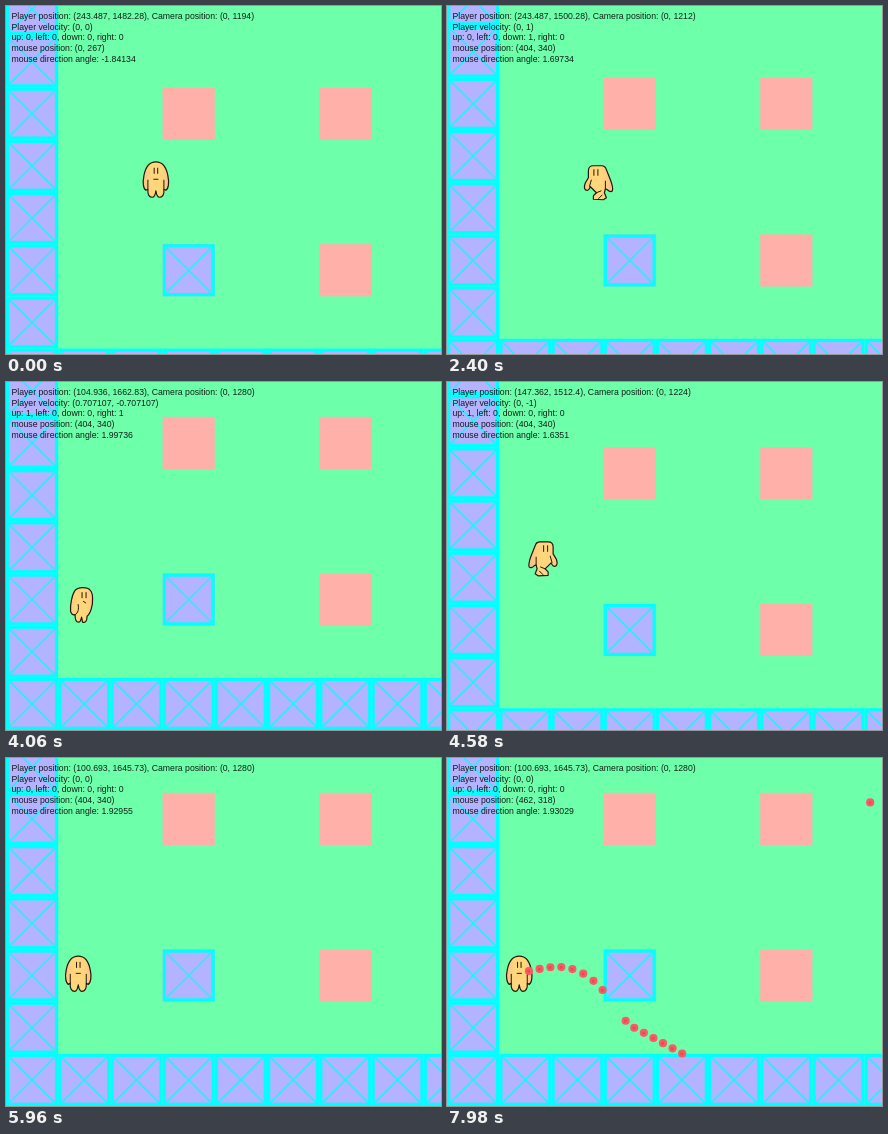
Write an HTML page with a canvas that moves like this. It is 435 by 348 pixels and loops after 8000 ms.

```html
<!DOCTYPE html>
<html lang="en">
<head>
<meta charset="utf-8">
<title>Top-down shooter</title>
<style>
  html, body { margin: 0; width: 100%; height: 100%; overflow: hidden; background: #6effaa; }
  canvas { display: block; width: 435px; height: 348px; }
</style>
</head>
<body>
<canvas id="stage" width="435" height="348"></canvas>
<script>
const ctx = document.getElementById('stage').getContext('2d');
const SCALE = 435 / 800;   // the game world is 800 x 640 units per screen
const LOOP = 8000, TICK = 20;
const TILE = 96, FLOOR = 1824, BLOCK = { x: 288, y: 1632 };
const START = { x: 243.487, y: 1482.279 };
const WALK_START = 2342, WALK_TICK = 18.7, WALK_SPEED = 6;
const SHOT_START = 6100, SHOT_SPEED = 20;

// keys held down, each for a number of steps
const ROUTE = 'D17 DL28 D5 R12 U11 L16 -1 UR11 U25 UL11 D37'.split(' ').map(run => {
  const [, keys, count] = run.match(/(\D+)(\d+)/);
  const held = key => +keys.includes(key);
  return { dx: held('R') - held('L'), dy: held('D') - held('U'), count: +count };
});

// turning points of the aim: time, degrees below the horizontal
const AIM = [
  [6100, -21], [6260, -22.2], [6700, 22.3], [6740, 22.3], [6800, -3.262],
  [6880, -36.5], [7260, -36.5], [7620, 28.3], [7760, 28.3], [7960, -11], [7980, -20.6]
];

const POSES = {
  idle: {
    body: 'M17.5-.8C25-.8 28 5 29.5 13C31 20 30 26 27.5 27.5L25.5 26.5C26 32 24 34.5 21 34.5C18.5 34.5 18 31 17.5 28C17 31 16.5 34.5 14 34.5C11 34.5 9 32 9.5 26.5L7.5 27.5C5 26 4 20 5.5 13C7 5 10-.8 17.5-.8Z',
    lines: 'M9.5 17V26.5M25.5 17V26.5M15 16.5H20',
    eyes: 'M15.8 5V11M19.3 5V11'
  },
  walk: {
    body: 'M9 8Q9 3 14 3H22Q26 3 27 7L31 17Q34 25 33 28Q31 30 28 27L26 26 25 30 27 35 24 37 14 36.5 14 33 17 30 11 24Q9 29 6 27Q4 25 6 20L9 15Z',
    lines: 'M26 18V26M12 17L10 24M17 30L22 28M19 36L23 32',
    eyes: 'M14.5 6.5V13M18.5 6.5V13'
  },
  side: {
    body: 'M8 4C10 1 20 0 23.5 5C26 9 28 18 27.5 25C27 28 25 29 23 28.5C23 32 22.5 36 19.5 36C17.5 36 17 33 16.5 31L15.5 36C12 37 11 34 11 30C8 28 5 20 5.5 12C5.5 8 6 6 8 4Z',
    lines: 'M20 18C19 23 20 27 23 28.5M12 17L15 15',
    eyes: 'M12 6V12M16 6V12'
  }
};
for (const pose of Object.values(POSES))
  for (const part in pose) pose[part] = new Path2D(pose[part]);

const clamp = u => Math.min(1, Math.max(0, u));
const lerp = (a, b, u) => a + (b - a) * u;
const smooth = u => u * u * (3 - 2 * u);
const easeOut = u => 1 - (1 - u) ** 3;
const sixDigits = v => String(Number(v.toPrecision(6)));

function playerAt(t) {
  let left = Math.max(0, Math.floor((t - WALK_START) / WALK_TICK));
  let { x, y } = START;
  for (const { dx, dy, count } of ROUTE) {
    if (!left) break;
    const steps = Math.min(left, count);
    const norm = Math.hypot(dx, dy) || 1;
    x += steps * WALK_SPEED * dx / norm;
    y += steps * WALK_SPEED * dy / norm;
    left -= steps;
    if (!left) return { x, y, dx, dy };
  }
  return { x, y, dx: 0, dy: 0 };
}

// Upward sweeps of the angle start fast, downward ones start gently.
function aimAt(t) {
  let i = 0;
  while (i < AIM.length - 2 && AIM[i + 1][0] <= t) i++;
  const [t0, a] = AIM[i], [t1, b] = AIM[i + 1];
  const ease = b > a ? easeOut : smooth;
  return lerp(a, b, ease(clamp((t - t0) / (t1 - t0)))) * Math.PI / 180;
}

function mouseAt(t, player, cam) {
  if (t < SHOT_START) {
    const u = smooth(clamp((t - TICK) / 1640));
    return { x: Math.round(lerp(0, 404, u)), y: Math.round(lerp(267, 340, u)) };
  }
  const angle = aimAt(t);
  const reach = t < 6800 ? lerp(255.6, 381.93, (t - SHOT_START) / 700)
                         : lerp(381.93, 317.6, (t - 6800) / 1180);
  return {
    x: Math.round(player.x + 64 + reach * Math.cos(angle)),
    y: Math.round(player.y - cam + 64 + reach * Math.sin(angle))
  };
}

function drawWall(x, y) {
  ctx.fillStyle = '#00ffff';
  ctx.fillRect(x, y, TILE, TILE);
  ctx.fillStyle = '#b3b3ff';
  ctx.fillRect(x + 6, y + 6, TILE - 12, TILE - 12);
  ctx.strokeStyle = '#00ffff';
  ctx.lineWidth = 2.3;
  ctx.beginPath();
  ctx.moveTo(x + 6, y + 6);
  ctx.lineTo(x + 90, y + 90);
  ctx.moveTo(x + 90, y + 6);
  ctx.lineTo(x + 6, y + 90);
  ctx.stroke();
}

function drawWorld() {
  ctx.fillStyle = '#ffb0a8';
  for (let row = 11; row <= 17; row += 3)
    for (let col = 3; col <= 6; col += 3)
      ctx.fillRect(col * TILE, row * TILE, TILE, TILE);
  for (let row = 11; row < 19; row++) drawWall(0, row * TILE);
  for (let col = 1; col < 9; col++) drawWall(col * TILE, FLOOR);
  drawWall(0, FLOOR);
  drawWall(BLOCK.x, BLOCK.y);
}

function drawPlayer({ x, y, dx, dy }, t) {
  const odd = Math.floor(t / 160) % 2 === 1;
  const name = dx ? 'side' : dy ? 'walk' : 'idle';
  const pose = POSES[name];
  const mirrored = name === 'side' ? dx > 0 : name === 'walk' && !odd;
  ctx.save();
  ctx.translate(x, y);
  ctx.scale(1 / SCALE, 1 / SCALE);
  if (name === 'side' && odd) ctx.translate(0, -4);
  if (mirrored) {
    ctx.translate(35, 0);
    ctx.scale(-1, 1);
  }
  const tone = ctx.createLinearGradient(4, 0, 31, 0);
  tone.addColorStop(0, '#ffbf8c');
  tone.addColorStop(0.3, '#ffd67c');
  tone.addColorStop(0.7, '#ffd67c');
  tone.addColorStop(1, '#ffbf8c');
  ctx.fillStyle = tone;
  ctx.fill(pose.body);
  ctx.strokeStyle = '#201808';
  ctx.lineJoin = 'round';
  ctx.lineWidth = 1.2;
  ctx.stroke(pose.body);
  ctx.lineWidth = 1;
  ctx.stroke(pose.lines);
  ctx.stroke(pose.eyes);
  ctx.restore();
}

const blocked = (x, y) => y > FLOOR ||
  (x > BLOCK.x && x < BLOCK.x + TILE && y > BLOCK.y - 10 && y < BLOCK.y + TILE + 10);

function drawShots({ x, y }, t) {
  for (let fired = SHOT_START; fired <= t; fired += TICK) {
    const angle = aimAt(fired), steps = (t - fired) / TICK;
    let sx = x + 50, sy = y + 26, alive = true;
    for (let i = 0; i < steps && alive; i++) {
      sx += SHOT_SPEED * Math.cos(angle);
      sy += SHOT_SPEED * Math.sin(angle);
      alive = !blocked(sx, sy);
    }
    if (!alive) continue;
    ctx.fillStyle = '#fa5a62';
    ctx.beginPath();
    ctx.arc(sx, sy, 7.5, 0, Math.PI * 2);
    ctx.fill();
    ctx.fillStyle = '#e84a54';
    ctx.fillRect(sx - 3, sy - 2, 5, 5);
  }
}

function drawText(player, cam, mouse) {
  const { x, y, dx, dy } = player;
  const norm = Math.hypot(dx, dy) || 1;
  const angle = Math.atan2(mouse.x - x - 64, mouse.y - (y - cam) - 64);
  const lines = [
    `Player position: (${sixDigits(x)}, ${sixDigits(y)}), Camera position: (0, ${cam})`,
    `Player velocity: (${sixDigits(dx / norm)}, ${sixDigits(dy / norm)})`,
    `up: ${+(dy < 0)}, left: ${+(dx < 0)}, down: ${+(dy > 0)}, right: ${+(dx > 0)}`,
    `mouse position: (${mouse.x}, ${mouse.y})`,
    `mouse direction angle: ${sixDigits(angle)}`
  ];
  ctx.fillStyle = 'rgba(0, 0, 0, 0.88)';
  ctx.font = '16px "Liberation Sans", Arial, sans-serif';
  lines.forEach((line, i) => ctx.fillText(line, 10, 23.4 + 20 * i));
}

function draw(now) {
  const t = Math.floor(now % LOOP / TICK) * TICK;
  const player = playerAt(t);
  const cam = Math.min(1280, Math.floor(player.y - 288));
  ctx.setTransform(SCALE, 0, 0, SCALE, 0, 0);
  ctx.fillStyle = '#6effaa';
  ctx.fillRect(0, 0, 800, 640);
  ctx.save();
  ctx.translate(0, -cam);
  drawWorld();
  drawPlayer(player, t);
  drawShots(player, t);
  ctx.restore();
  drawText(player, cam, mouseAt(t, player, cam));
}

const start = performance.now();
function loop() {
  draw(performance.now() - start);
  requestAnimationFrame(loop);
}
loop();
</script>
</body>
</html>
```
